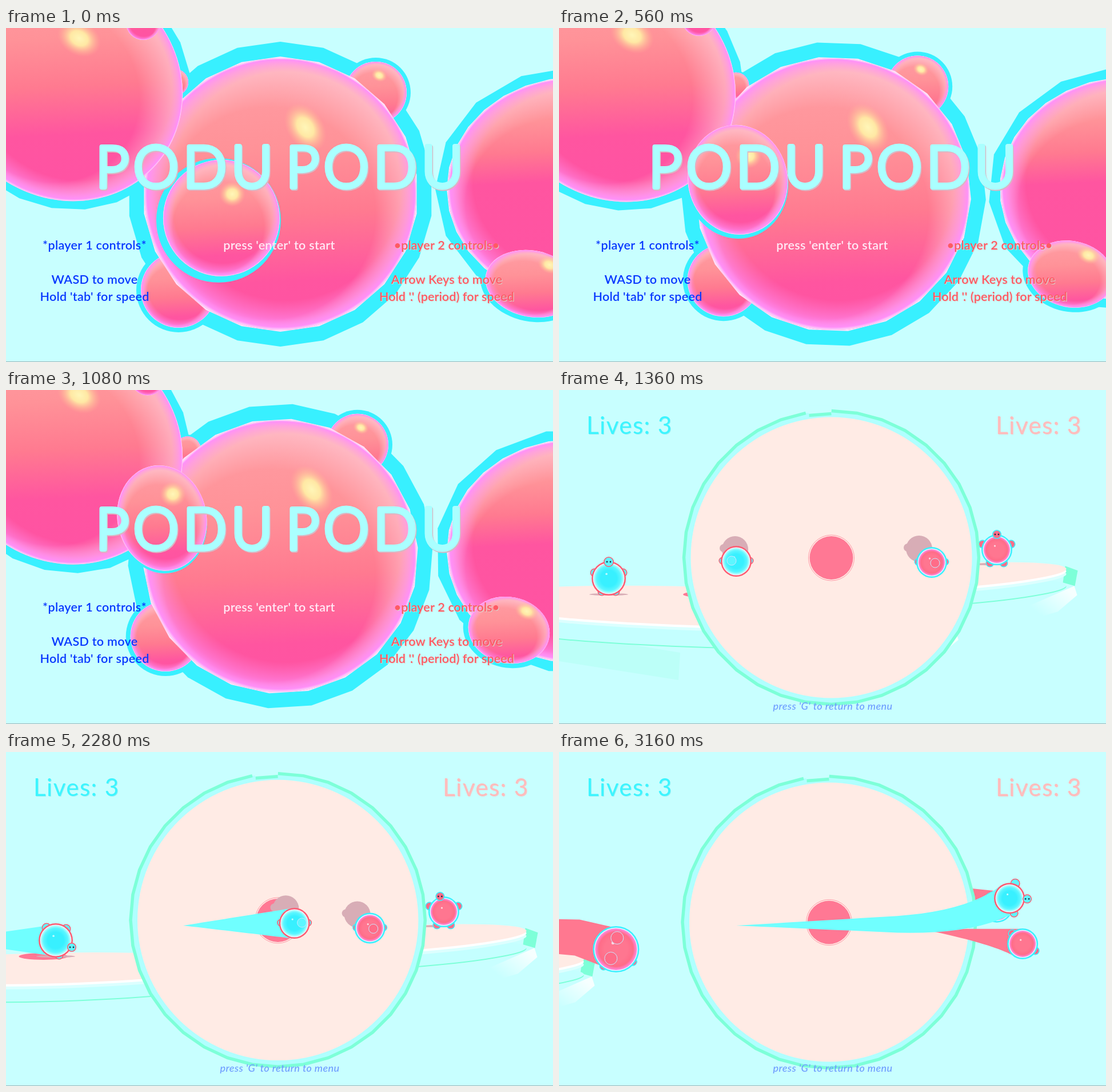
Write an HTML page with a canvas that moves like this. It is 957 px wide and 585 px high and loops after 3.2 s.

```html
<!DOCTYPE html>
<html lang="en">
<head>
<meta charset="utf-8">
<title>PODU PODU</title>
<style>
html, body { margin: 0; width: 100%; height: 100%; overflow: hidden; background: #c8ffff; }
canvas { display: block; }
</style>
</head>
<body>
<canvas id="stage" width="957" height="585"></canvas>
<script>
const ctx = document.getElementById('stage').getContext('2d');
const LOOP = 3200, CUT = 1240, DASH = 1755, HIT = 2500;
const SKY = '#c8ffff', CYAN = '#38f0ff', RED = '#ff5a70', SHADE = '#d8adb6';
const PALE = '#ffebe5', MINT = '#7dffd8', TAU = Math.PI * 2;

const clamp = v => Math.max(0, Math.min(1, v));
const mix = (a, b, k) => a + (b - a) * k;
const smooth = k => (k = clamp(k), k * k * (3 - 2 * k));

function shape(points, fill) {
  ctx.beginPath();
  points.forEach(p => ctx.lineTo(p[0], p[1]));
  ctx.closePath();
  ctx.fillStyle = fill;
  ctx.fill();
}

function oval(x, y, rx, ry, fill, rot = 0) {
  ctx.beginPath();
  ctx.ellipse(x, y, rx, ry, rot, 0, TAU);
  ctx.fillStyle = fill;
  ctx.fill();
}

const dot = (x, y, r, fill) => oval(x, y, r, r, fill);

function ring(x, y, r, color, width) {
  ctx.beginPath();
  ctx.arc(x, y, r, 0, TAU);
  ctx.strokeStyle = color;
  ctx.lineWidth = width;
  ctx.stroke();
}

// Low-poly ellipse
function facets(x, y, rx, ry, rot, n, phase) {
  const c = Math.cos(rot), s = Math.sin(rot), pts = [];
  for (let i = 0; i < n; i++) {
    const a = phase + i / n * TAU, u = rx * Math.cos(a), v = ry * Math.sin(a);
    pts.push([x + u * c - v * s, y + u * s + v * c]);
  }
  return pts;
}

// Draws a unit disc fitted to an ellipse
function disc(x, y, rx, ry, rot, ...fills) {
  ctx.save();
  ctx.translate(x, y);
  ctx.rotate(rot);
  ctx.scale(rx, ry);
  fills.forEach(f => dot(0, 0, 1, f));
  ctx.restore();
}

function radial(x, y, r, stops) {
  const g = ctx.createRadialGradient(x, y, r, 0, 0, 1);
  stops.forEach(([at, c]) => g.addColorStop(at, c));
  return g;
}

function text(str, x, y, size, color, o = {}) {
  ctx.font = `${o.style || 'normal'} ${o.weight || 600} ${size}px Lato, "Open Sans", sans-serif`;
  ctx.letterSpacing = (o.gap || 0) + 'px';
  ctx.textAlign = o.align || 'center';
  if (o.shade) {
    ctx.fillStyle = o.shade;
    ctx.fillText(str, x + 1, y + 1);
  }
  ctx.fillStyle = color;
  ctx.fillText(str, x, y);
}

/* ---------- menu ---------- */

const RIM = radial(0.04, -0.06, 0.84, [[0, 'rgba(255,140,220,0)'], [0.6, 'rgba(255,140,240,.55)'],
  [0.9, 'rgba(255,142,250,.95)'], [1, '#ffd8fc']]);
const SHEEN = radial(-0.08, 0.14, 0.78, [[0, 'rgba(255,205,215,0)'], [1, 'rgba(255,205,220,.75)']]);
const GLINT = radial(0, 0, 0, [[0, '#fff6b8'], [0.4, '#ffe8a4'], [1, 'rgba(255,180,150,0)']]);

// k: height at which the shading turns hot pink
function ball(x, y, rx, ry, rot, k) {
  const g = ctx.createLinearGradient(x, y - ry, x + ry * 0.1, y + ry);
  g.addColorStop(0, '#ff9ea4');
  g.addColorStop(k * 0.4, '#ff9298');
  g.addColorStop(k * 0.7, '#ff7a90');
  g.addColorStop(k, '#ff55a0');
  g.addColorStop(1, '#ff52a4');
  oval(x, y, rx, ry, g, rot);
  disc(x, y, rx, ry, rot, SHEEN, RIM);
}

const glow = (x, y, rx, ry, rot) => disc(x, y, rx, ry, rot, GLINT);

function title(str, x, y) {
  ctx.font = '300 100px Lato, "Open Sans", sans-serif';
  ctx.letterSpacing = '8px';
  ctx.textAlign = 'left';
  ctx.lineJoin = ctx.lineCap = 'round';
  ctx.lineWidth = 8;
  for (const [d, c] of [[1.5, '#d8b8c4'], [0, '#aaffff']]) {
    ctx.fillStyle = ctx.strokeStyle = c;
    ctx.fillText(str, x + d, y + d);
    ctx.strokeText(str, x + d, y + d);
  }
}

function menu(t) {
  // All the bumps roll up and to the left together
  const u = t / 880, e = u + 0.3 * u * (1 - u);
  const roll = (x, y, dx, dy) => [x + dx * e, y + dy * e];
  const spin = -0.19 * t / 1000 - Math.PI / 2;
  const [fx, fy] = roll(377, 333, -91, -95);
  const [ex, ey] = roll(647, 113, -28, -15);
  const [bx, by] = roll(302, 459, -20, -24);
  const [nx, ny] = roll(240, -9, 7, -10);
  const [sx, sy] = roll(296, 95, 19, 8);
  const [px, py] = roll(920, 448, -35, -24);
  const frx = 102 - 21 * e, fry = 102 - 8 * e, br = 66 - 4 * e, prx = 82 - 9 * e;
  const tilt = 0.66, ly = 100 + 2 * e;

  shape(facets(102, ly, 229, 212, tilt, 24, spin), CYAN);
  dot(nx, ny, 36, CYAN);
  dot(bx, by, br + 8, CYAN);
  dot(ex, ey, 61, CYAN);
  shape(facets(480, 291, 267, 267, 0, 22, spin), CYAN);
  dot(sx, sy, 26, CYAN);
  ball(sx, sy, 23, 23, 0, 1);
  ball(ex, ey, 54, 54, 0, 1);
  glow(ex + 6, ey - 30, 14, 11, 0.4);
  ball(bx, by, br, br, 0, 0.85);

  oval(px, py, prx + 9, 66, CYAN, 0.2);
  shape(facets(995, 282, 244, 214, 0, 16, spin), CYAN);
  shape(facets(995, 282, 224, 196, 0, 32, spin), '#ffe0fc');
  ball(995, 282, 222, 194, 0, 0.46);
  ball(px, py, prx, 58, 0.2, 0.9);
  glow(px + 31, py - 33, 21, 15, 0.35);

  shape(facets(480, 291, 241, 241, 0, 22, spin), '#ffe0fc');
  ball(480, 291, 238, 238, 0, 0.82);
  glow(532 + 10 * Math.sin(t / 280 - 1), 174, 32, 46, -0.6);

  const shell = 7 * (1 - e * 0.8);
  oval(fx - 5 + 4 * e, fy + 4, frx + shell, fry + shell, CYAN, -0.2);
  ball(102, ly, 213, 197, tilt, 0.72);
  glow(128, 18 - 8 * e, 40, 30, 0.5);
  ball(nx, ny, 30, 30, 0, 0.7);
  ball(fx, fy, frx, fry, -0.2, 0.82);
  glow(fx + 19, fy - 42, 23, 22, 0);

  title('PODU', 157, 279);
  title('PODU', 490, 279);
  const blue = '#0838ff', red = '#ff5a64', o = { gap: 0.3 }, shaded = { gap: 0.1, shade: '#d6d8d0' };
  text('*player 1 controls*', 155, 388, 21.5, blue, o);
  text('WASD to move', 155, 448, 21.5, blue, o);
  text("Hold 'tab' for speed", 155, 478, 21.5, blue, o);
  text("press 'enter' to start", 478, 388, 21.5, '#ffeaf6', o);
  text('•player 2 controls•', 771, 388, 21.5, red, shaded);
  text('Arrow Keys to move', 771, 448, 21.5, red, shaded);
  text("Hold '.' (period) for speed", 771, 478, 21.5, red, shaded);
}

/* ---------- game ---------- */

const BLUE_SKIN = { core: '#38f0ff', mid: '#5cf6ff', rim: '#b4ffff', line: RED, trail: '#70ffff' };
const RED_SKIN = { core: '#ff7690', mid: '#ff6c88', rim: '#ff8ae4', line: CYAN, trail: '#ff7890' };
const STAND = [[-25, -10, 6], [25, -10, 6], [-12, 23, 6], [12, 23, 6]];
const ARMS = [[-24, -1, 5], [24, -1, 5]];
const TUMBLE = [[-18, -18, 6], [22, 12, 6]];

function part(x, y, r, s) {
  dot(x, y, r + 1.5, s.line);
  dot(x, y, r, s.mid);
}

function bump(x, y, r, s) {
  dot(x, y, r, s.mid);
  ring(x, y, r, '#c8e8ff', 1);
}

function face(x, y, r, s) {
  part(x, y, r, s);
  dot(x - 3, y, 1.4, '#20304a');
  dot(x + 3, y, 1.4, '#20304a');
}

function body(x, y, r, s, limbs) {
  limbs.forEach(b => part(x + b[0], y + b[1], b[2], s));
  dot(x, y, r + 4, s.line);
  dot(x, y, r + 1.5, '#e4f4ff');
  const g = ctx.createRadialGradient(x, y, r * 0.55, x, y, r);
  g.addColorStop(0, s.core);
  g.addColorStop(0.6, s.mid);
  g.addColorStop(1, s.rim);
  dot(x, y, r, g);
  dot(x - r * 0.15, y - r * 0.3, r * 0.07, 'rgba(255,255,255,.7)');
}

// Ribbon that widens from its tail to its head
function ribbon(pts, w0, w1, fill) {
  const up = [], down = [], n = pts.length - 1;
  pts.forEach((p, i) => {
    const a = pts[Math.max(0, i - 1)], b = pts[Math.min(n, i + 1)];
    const dx = b[0] - a[0], dy = b[1] - a[1], d = Math.hypot(dx, dy) || 1;
    const w = mix(w0, w1, i / n);
    up.push([p[0] - dy / d * w, p[1] + dx / d * w]);
    down.unshift([p[0] + dy / d * w, p[1] - dx / d * w]);
  });
  shape(up.concat(down), fill);
}

function history(pos, from, to) {
  return Array.from({ length: 25 }, (_, i) => pos(mix(from, to, i / 24)));
}

const since = (t, t0) => Math.max(0, t - t0);

// Steady dash that slows and curves away after the collision
function bluePos(t) {
  return [310 + 0.37 * since(t, DASH) - 1.55e-4 * since(t, 2640) ** 2,
    300 - 1e-4 * since(t, HIT) ** 2];
}

// Slow walk to the left, then knocked to the right
function redPos(t) {
  const walk = clamp((t - 1360) / (HIT - 1360)), q = since(t, HIT) / 660;
  return [652 - 19 * walk + 178 * (q + 0.5 * q * (1 - q)), 302 + 8 * walk + 26 * q];
}

function platform(cx, cy, rx, ry, rot, depth) {
  const x = cx + rx * Math.cos(rot), y = cy + rx * Math.sin(rot);
  const g = ctx.createLinearGradient(x, y + 35, x - 40, y + 85);
  g.addColorStop(0, '#f6ffff');
  g.addColorStop(1, SKY);
  shape([[x - 68, y + 66], [x + 14, y + 30], [x + 19, y + 46], [x - 15, y + 75], [x - 42, y + 83]], g);
  shape([[x - 2, y - 5], [x + 20, y + 3], [x + 15, y + 30], [x - 6, y + 24]], MINT);
  const layers = [[depth + 2, MINT], [depth, '#c4ffff'], [9, '#dcffff'], [4, '#ffffff'], [0, PALE]];
  layers.forEach(([dy, c]) => oval(cx, cy + dy, rx, ry, c, rot));
}

function leftView(t) {
  const [wx] = bluePos(t), far = clamp((wx - 310) / 326), d = since(t, HIT);
  ctx.globalAlpha = 0.6 * clamp((DASH - t) / 100);
  shape([[0, 425], [212, 460], [209, 508], [0, 475]], '#b4fff4');
  ctx.globalAlpha = 1;

  // The camera follows the blue player, so the ground slides the other way
  const cx = 570 - wx;
  platform(cx, 379, mix(420, 262, far), mix(34, 22, far), mix(0.03, -0.06, far), mix(37, 26, far));
  if (far < 1) oval(cx, 358, 43, 6, '#ff7894');

  const x = 87 - 3.6e-4 * d * d, y = 330;
  if (!d) oval(x, y + 28, 34, 2, SHADE);
  if (t > DASH) ribbon([[x - 10 - (t - DASH) * 0.35, y], [x, y]], 0, 28, BLUE_SKIN.trail);
  if (t > DASH && !d) {
    body(x, y, 26, BLUE_SKIN, [[-16, -22, 7], [18, -20, 7], [6, 26, 6]]);
    face(x + 28, y + 12, 6.5, BLUE_SKIN);
  } else {
    body(x, y, 26, BLUE_SKIN, STAND);
    face(x, y - 29, 7.5, BLUE_SKIN);
  }
  if (!d) return;

  const rx = 152 - 0.079 * d + 100 * Math.exp(-d / 25), ry = 327 + 0.028 * d, rr = 28 + 0.013 * d;
  ribbon([[x - 30, y - 12], [mix(x, rx, 0.6), y - 5], [rx, ry]], 27, rr, RED_SKIN.trail);
  const a = d / 300;
  body(rx, ry, rr, RED_SKIN, [[rr * Math.sin(a), -rr * Math.cos(a), 6], [rr * Math.cos(a), rr * Math.sin(a), 6]]);
  if (d > 300) {
    bump(rx + 2, ry - 20, 11, RED_SKIN);
    bump(rx - 9, ry + 16, 11, RED_SKIN);
  }
}

function rightView(t) {
  const d = since(t, HIT), x = 766, y = 280 - 0.014 * d;
  ctx.save();
  ctx.beginPath();
  ctx.rect(600, 0, 357, 585);
  ctx.clip();
  platform(640 - 1.5 * (redPos(t)[0] - 652), 328, 248, 22, -0.06, 29);
  if (d) {
    body(700 + 25 * Math.sin(Math.PI * clamp(d / 300)), 279, 20, BLUE_SKIN, []);
    ribbon([[x - 20 - 0.06 * d, y - 0.014 * d], [x, y]], 24, 27, RED_SKIN.trail);
    body(x, y, 24, RED_SKIN, [[20, -22, 6], [28, 4, 6]]);
  } else {
    oval(x - 12, y + 25, 30, 2, SHADE);
    body(x, y, 23, RED_SKIN, STAND);
    face(x - since(t, 1360) / 140, y - 27, 6.5, RED_SKIN);
  }
  ctx.restore();
}

function arena(cx, cy, r) {
  const wall = facets(cx, cy, r + 12, r + 11, 0, 36, -Math.PI / 2);
  shape(wall, '#b0ffff');
  dot(cx, cy, r, PALE);
  ctx.strokeStyle = MINT;
  ctx.lineWidth = 5.5;
  ctx.lineJoin = 'miter';
  ctx.lineCap = 'butt';
  ctx.beginPath();
  wall.forEach(p => ctx.lineTo(p[0], p[1]));
  ctx.stroke();
  shape([[cx - 42, cy - r - 20], [cx, cy - r - 20], [cx, cy - r - 5], [cx - 39, cy - r - 2]], SKY);
  ctx.beginPath();
  ctx.moveTo(cx - 39, cy - r - 3);
  ctx.lineTo(cx, cy - r - 6);
  ctx.stroke();
  dot(cx, cy + 0.5, 38, '#ff7894');
  ring(cx, cy + 0.5, 40, '#ff9aa8', 1);
}

function shadow(x, y) {
  dot(x, y, 23, SHADE);
  dot(x - 20, y - 2, 7, SHADE);
}

function topView(t) {
  const cam = smooth((t - 2150) / 450);
  arena(476.5 - 4 * cam, 293.5 + 4.5 * cam, 246 - 1.5 * cam);
  const [bx, by] = bluePos(t), [rx, ry] = redPos(t);
  const dash = t > DASH, hit = t > HIT, late = t > 2850;
  const far = clamp((bx - 310) / 326);
  ctx.globalAlpha = clamp((late ? 0 : 2850 - t) / 150);
  shadow(bx - 2 - 22 * far, by - 21 - 8 * far);
  shadow(rx - 22, ry - 24);
  ctx.globalAlpha = 1;

  if (hit) ribbon(history(redPos, HIT, t), Math.max(0, 2800 - t) / 16, 27, RED_SKIN.trail);
  const drawRed = () => {
    body(rx, ry, 23, RED_SKIN, hit ? TUMBLE : ARMS);
    if (!late) bump(rx + (hit ? -14 : 6), ry + 1, 8, RED_SKIN);
  };
  if (late) drawRed();
  if (dash) ribbon(history(bluePos, DASH, t).map(([x, y], i) => [x, y + 4 - i / 6]), 0, 27, BLUE_SKIN.trail);
  if (!late) drawRed();
  body(bx, by, 23, BLUE_SKIN, late ? [[10, -26, 7], [8, 26, 6]] : hit ? TUMBLE : ARMS);
  if (late) face(bx + 31, by + 1, 6.5, BLUE_SKIN);
  else bump(bx + (dash ? 13 : -8), by - 1, 8, BLUE_SKIN);
}

function game(t) {
  leftView(t);
  rightView(t);
  topView(t);
  const big = { align: 'left', gap: 1.5, weight: 400 };
  text('Lives: 3', 48, 77, 42, '#3cf5ff', { ...big, shade: '#90f0f4' });
  text('Lives: 3', 764, 77, 42, '#ffbcbc', { ...big, shade: '#f0cccc' });
  text("press 'G' to return to menu", 479, 560, 18, '#6e9cff', { style: 'italic', weight: 500, gap: 0.4 });
}

function draw(now) {
  const t = now % LOOP;
  ctx.fillStyle = SKY;
  ctx.fillRect(0, 0, 957, 585);
  (t < CUT ? menu : game)(t);
  ctx.fillStyle = '#9cb4b8';
  ctx.fillRect(0, 584, 957, 1);
}

const start = performance.now();
function tick() {
  draw(performance.now() - start);
  requestAnimationFrame(tick);
}
tick();
</script>
</body>
</html>
```
